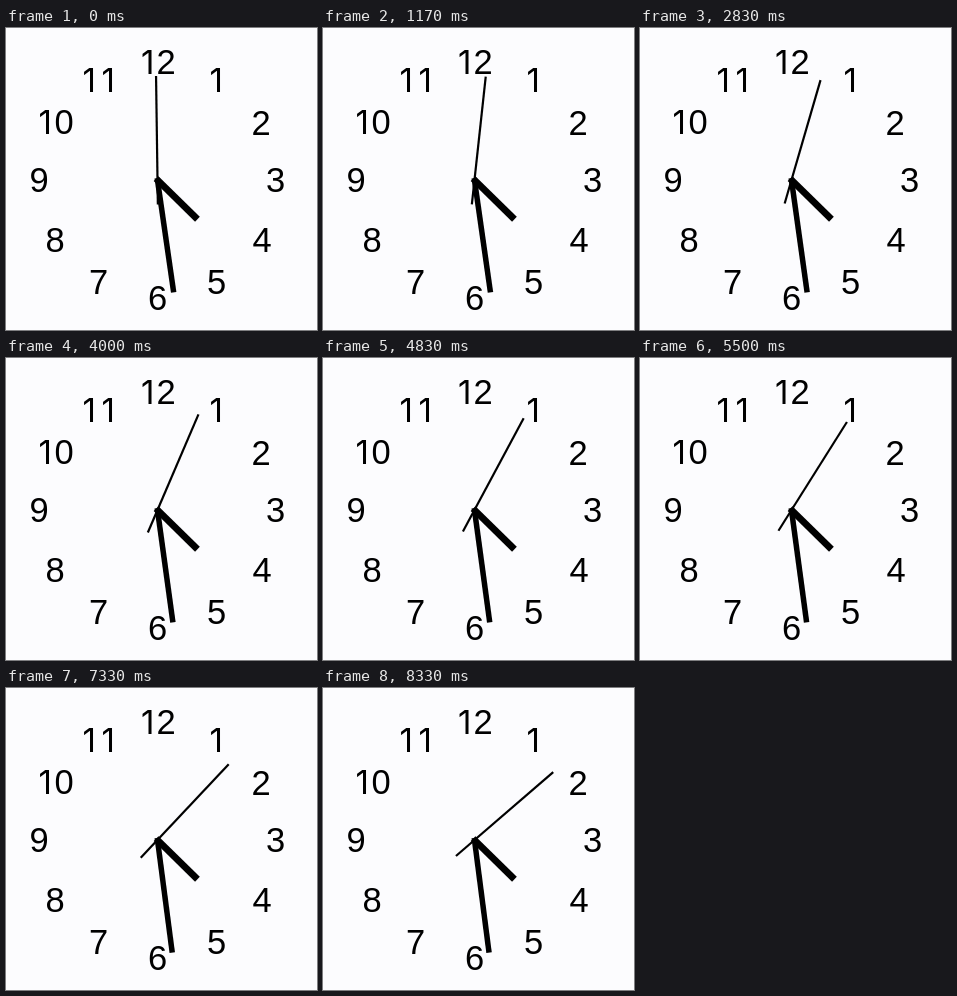
An HTML page with a canvas that plays this animation: 311x302 px, repeating every 8490 ms.

```html
<!DOCTYPE html>
<html lang="en">
<head>
<meta charset="utf-8">
<title>Clock</title>
<style>
  html, body { margin: 0; width: 100%; height: 100%; overflow: hidden; background: #fcfcfe; }
  canvas { display: block; }
</style>
</head>
<body>
<canvas id="clock" width="311" height="302"></canvas>
<script>
const LOOP = 8490, STEP = 500 / 3;
const ctx = document.getElementById('clock').getContext('2d');

// digit, ink centre x, baseline y
const digits = [
  ['1', 141, 46], ['2', 160, 46], ['1', 209.5, 63.5], ['2', 255, 107],
  ['3', 269.5, 164], ['4', 256, 224], ['5', 210.5, 266], ['6', 151.5, 282],
  ['7', 92.5, 266], ['8', 49, 223.5], ['9', 33, 164],
  ['1', 38.5, 106], ['0', 58, 106], ['1', 82.5, 63.5], ['1', 101.5, 63.5]
];

function drawDigit([char, x, y]) {
  // Inter supplies a "1" without a foot
  ctx.font = char === '1' ? '33px Inter, sans-serif' : '34.5px "Liberation Sans", Arial, sans-serif';
  const m = ctx.measureText(char);
  ctx.fillText(char, x - (m.actualBoundingBoxRight - m.actualBoundingBoxLeft) / 2, y);
}

function drawHand(degrees, length, tail, width) {
  ctx.save();
  ctx.translate(151.5, 152);
  ctx.rotate(degrees * Math.PI / 180);
  ctx.fillRect(-width / 2, -length, width, length + tail);
  ctx.restore();
}

function draw(now) {
  const time = Math.floor(now % LOOP / 10) * 10;
  const tick = Math.floor((time + 5) / STEP);
  ctx.fillStyle = '#fcfcfe';
  ctx.fillRect(0, 0, 311, 302);
  ctx.fillStyle = '#000';
  digits.forEach(drawDigit);
  drawHand(134.5, 56, 2, 6.8);
  drawHand(171.8 + tick / 60, 113.5, 2, 5.5);
  drawHand(tick - 0.8, 104, 24.5, 2.2);
}

const start = performance.now();
function loop() {
  draw(performance.now() - start);
  requestAnimationFrame(loop);
}
loop();
</script>
</body>
</html>
```
